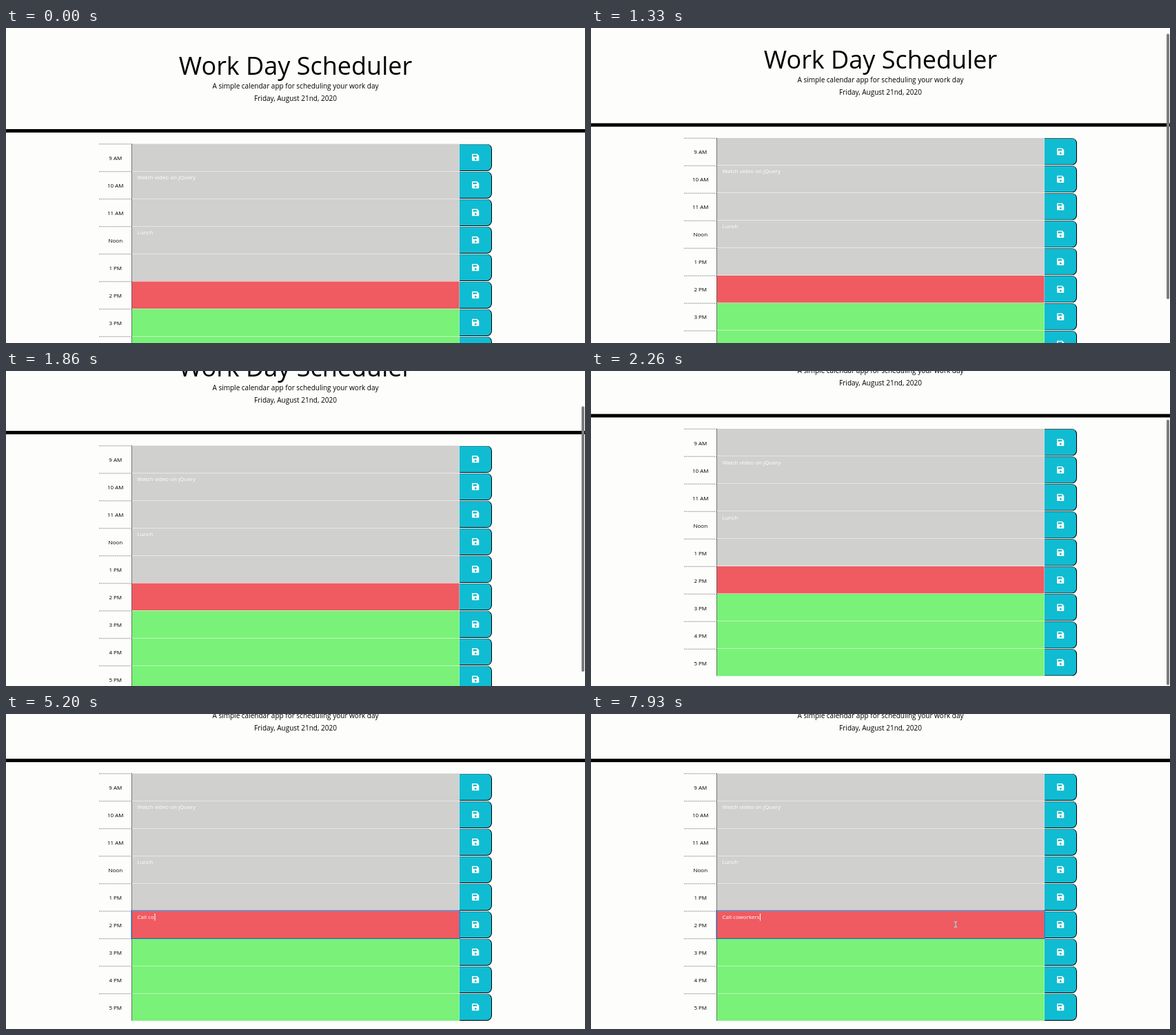
Recreate the animation shown at these times as an HTML page. Size 840 by 458 pixels, loop 8 s.

```html
<!DOCTYPE html>
<html lang="en">
<head>
<meta charset="utf-8">
<title>Work Day Scheduler</title>
<style>
  html, body { margin: 0; width: 100%; height: 100%; overflow: hidden; background: #fdfdfc; }
  /* The page is laid out at 1680 px wide and shown at half size. */
  #stage { position: absolute; width: 1680px; height: 916px; overflow: hidden;
    transform: scale(.5); transform-origin: 0 0; font: 16px/24px "Open Sans", sans-serif; color: #000; }
  #page { position: absolute; width: 100%; }
  header { height: 294px; border-bottom: 10px solid #000; text-align: center; }
  h1 { margin: 0; padding-top: 64px; font-size: 72px; line-height: 86px; font-weight: 400; }
  header p { margin: 0; font-size: 20px; line-height: 36px; }
  main { width: 1140px; margin: 32px auto 0; }
  .row { display: flex; height: 79px; border-top: 1px solid #fff; }
  .hour { width: 95px; box-sizing: border-box; border-top: 1px dashed #000; text-align: center; line-height: 80px; }
  .task { position: relative; width: 950px; box-sizing: border-box; padding: 5px 15px; border-left: 1px solid #000;
    background: #d0d0ce; color: #fff; white-space: pre; }
  .now { background: #f05a61; }
  .next { background: #7af178; }
  .focus { outline: 2px solid #0f5fc4; z-index: 1; }
  .save { width: 95px; box-sizing: border-box; border: 2px outset #000; border-left: 1px solid #000;
    border-radius: 0 15px 15px 0; background: #10bcd2; display: flex; align-items: center; justify-content: center; }
  #caret { display: inline-block; width: 2px; height: 21px; margin-left: 1px; background: #fff; vertical-align: -5px; }
  #bar { position: absolute; left: 1670px; width: 8px; height: 772px; border-radius: 4px; background: #7c7c7c; }
  #pointer { position: absolute; left: -7px; top: -10px; }
</style>
</head>
<body>
<div id="stage">
  <div id="page">
    <header>
      <h1>Work Day Scheduler</h1>
      <p>A simple calendar app for scheduling your work day</p>
      <p>Friday, August 21nd, 2020</p>
    </header>
    <main></main>
  </div>
  <div id="bar"></div>
  <svg id="pointer" width="14" height="20" fill="none" stroke-linecap="round">
    <path d="M3 2H5Q7 2 7 4Q7 2 9 2H11M7 4V16M3 18H5Q7 18 7 16Q7 18 9 18H11" stroke="#777" stroke-width="3.4"/>
    <path d="M3 2H5Q7 2 7 4Q7 2 9 2H11M7 4V16M3 18H5Q7 18 7 16Q7 18 9 18H11" stroke="#eee" stroke-width="1.8"/>
  </svg>
</div>
<script>
const $ = id => document.getElementById(id);
const LOOP = 8000, FPS = 15, END = 164;
const hours = ['9 AM', '10 AM', '11 AM', 'Noon', '1 PM', '2 PM', '3 PM', '4 PM', '5 PM'];
const tasks = { 1: 'Watch video on jQuery', 3: 'Lunch', 5: '<span id="typed"></span><i id="caret"></i>' };
const icon = `<svg width="21" height="21" viewBox="0 0 21 21"><path fill="#fff" fill-rule="evenodd"
  d="M2.2 0H15L21 6V18.8Q21 21 18.8 21H2.2Q0 21 0 18.8V2.2Q0 0 2.2 0ZM3 3V8.2H14V3Z
  M10.5 12a3 3 0 0 0 0 6a3 3 0 0 0 0-6Z"/></svg>`;

document.querySelector('main').innerHTML = hours.map((hour, i) => `<div class="row">
  <div class="hour">${hour}</div>
  <div class="task ${i > 5 ? 'next' : i == 5 ? 'now' : ''}">${tasks[i] || ''}</div>
  <div class="save">${icon}</div></div>`).join('');

const text = 'Call coworkers';
const keys = [4000, 4260, 4460, 4600, 4800, 5060, 5200, 5530, 5660, 6130, 6400, 6600, 6730, 6930];
// [time, scroll offset]: speeds up, overshoots the bottom and springs back
const scroll = [[1066, 0], [1133, 2], [1200, 4], [1333, 17], [1600, 66], [1867, 120],
  [2067, 155], [2200, 168], [2267, 169], [2467, END]];

function along(points, t) {
  const i = points.findIndex(p => p[0] > t);
  if (i == 0) return points[0][1];
  if (i < 0) return points[points.length - 1][1];
  const [t0, a] = points[i - 1], [t1, b] = points[i];
  return a + (b - a) * (t - t0) / (t1 - t0);
}
const within = (t, a, b) => t >= a && t < b;
const now = document.querySelector('.now');

function draw(t) {
  const step = Math.floor((t + 8) * FPS / 1000) * 1000 / FPS;
  const y = along(scroll, step);
  $('page').style.transform = `translateY(${-y}px)`;
  $('bar').style.transform = `translateY(${2 + Math.min(y, 166) * .84}px)`;
  $('bar').style.opacity = t < 1130 ? 0 : along([[2300, 1], [2460, 0]], step);

  now.classList.toggle('focus', t >= 2800);
  $('typed').textContent = text.slice(0, keys.filter(k => k <= t).length);
  const lit = within(t, 2800, 3330) || within(t, 3730, 7400) || t >= 7860;
  $('caret').style.visibility = lit ? 'visible' : 'hidden';

  const [px, py] = t < 2800 ? [1038, 602] : t < 4000 ? [1042, 600] : t < 7930 ? [1050, 606] : [1058, 612];
  $('pointer').style.transform = `translate(${px}px, ${py}px)`;
  $('pointer').style.visibility = within(t, 2730, 4000) || t >= 7860 ? 'visible' : 'hidden';
}

const start = performance.now();
function tick() {
  draw((performance.now() - start) % LOOP);
  requestAnimationFrame(tick);
}
tick();
</script>
</body>
</html>
```
